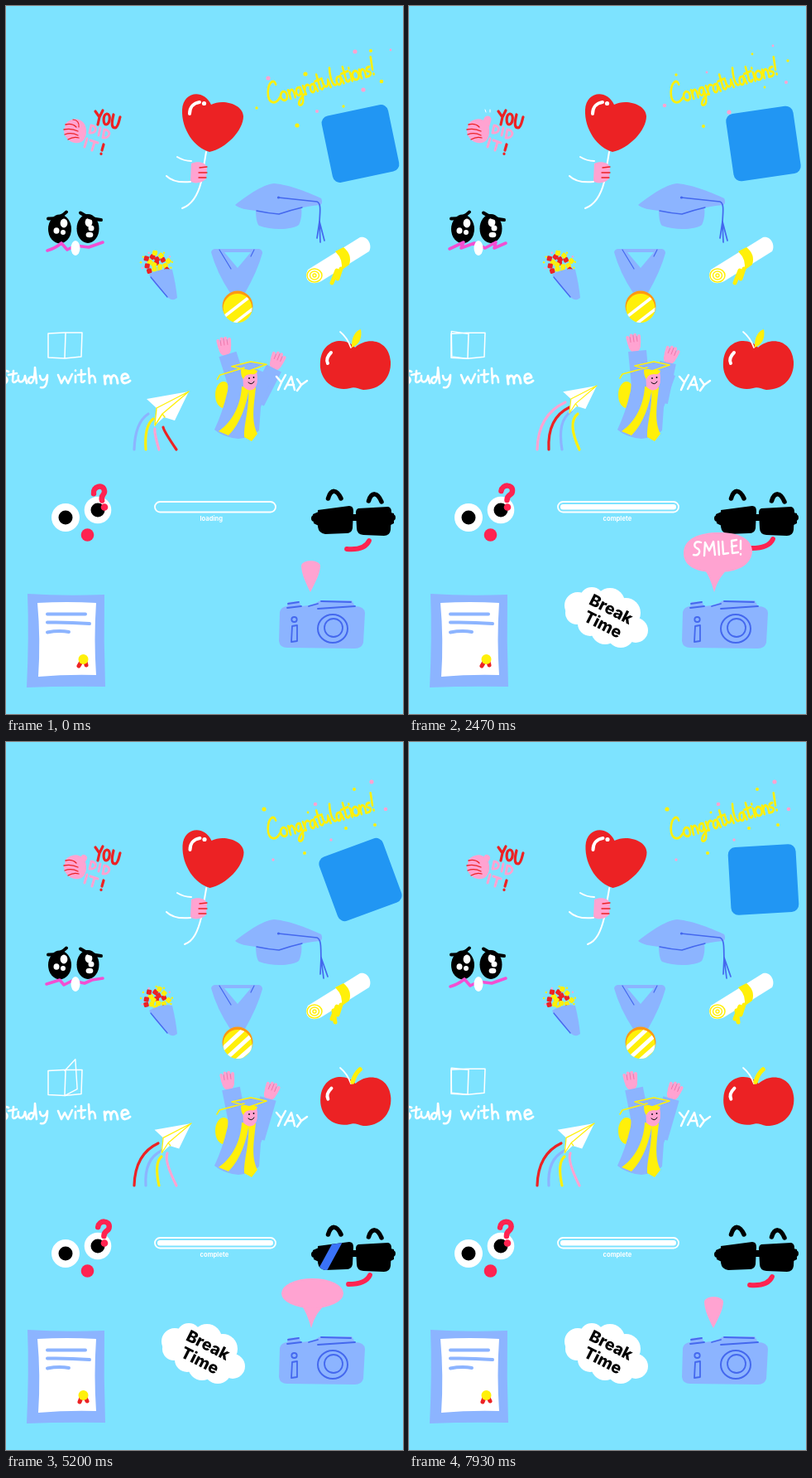
Recreate the animation shown at these times as an HTML page with a canvas. Size 480 px wide and 854 px high, loop 8000 ms.

```html
<!DOCTYPE html>
<html lang="en">
<head>
<meta charset="utf-8">
<title>Graduation stickers</title>
<style>
html, body { margin: 0; width: 100%; height: 100%; overflow: hidden; background: #7de3ff; }
canvas { display: block; width: 480px; height: 854px; }
</style>
</head>
<body>
<canvas id="stage"></canvas>
<script>
const canvas = document.getElementById('stage');
const ctx = canvas.getContext('2d');
const ratio = window.devicePixelRatio || 1;
canvas.width = 480 * ratio;
canvas.height = 854 * ratio;

const SKY = '#7de3ff', WHITE = '#fff', BLACK = '#000', RED = '#ec2224', PINK = '#ffa3d1';
const BLUE = '#8cb4ff', INK = '#4468ee', YELLOW = '#fff00a', CRIMSON = '#ff2350', MAGENTA = '#f24fd2';
const LOOP = 8000, FPS = 15, BEAT = 700, LOADER = 2950;

const cache = new Map();
function shape(d) {
  if (!cache.has(d)) cache.set(d, new Path2D(d));
  return cache.get(d);
}
function fill(d, color, rule = 'nonzero') {
  ctx.fillStyle = color;
  ctx.fill(shape(d), rule);
}
function line(d, color, width) {
  ctx.strokeStyle = color;
  ctx.lineWidth = width;
  ctx.stroke(shape(d));
}
function oval(x, y, rx, ry, color) {
  ctx.fillStyle = color;
  ctx.beginPath();
  ctx.ellipse(x, y, rx, ry, 0, 0, 7);
  ctx.fill();
}
const dot = (x, y, r, color) => oval(x, y, r, r, color);
function ring(x, y, rx, ry, color, width) {
  ctx.strokeStyle = color;
  ctx.lineWidth = width;
  ctx.beginPath();
  ctx.ellipse(x, y, rx, ry, 0, 0, 7);
  ctx.stroke();
}
function box(x, y, w, h, r, color) {
  ctx.fillStyle = color;
  ctx.beginPath();
  ctx.roundRect(x, y, w, h, r);
  ctx.fill();
}
// Draw inside a frame turned and scaled around (x, y).
function around(x, y, deg, scale, draw) {
  ctx.save();
  ctx.translate(x, y);
  ctx.rotate(deg * Math.PI / 180);
  ctx.scale(scale, scale);
  ctx.translate(-x, -y);
  draw();
  ctx.restore();
}
function star(x, y, r, points, color) {
  ctx.fillStyle = color;
  ctx.beginPath();
  for (let i = 0; i < points * 2; i++) {
    const a = i * Math.PI / points - 1.4, q = i % 2 ? r * 0.55 : r;
    ctx.lineTo(x + q * Math.cos(a), y + q * Math.sin(a));
  }
  ctx.fill();
}
const part = (t, period) => (t + 1) % period / period;
// Linear interpolation through [position, value] pairs.
function track(keys, x) {
  let i = 1;
  while (i < keys.length - 1 && x > keys[i][0]) i++;
  const [a, p] = keys[i - 1], [b, q] = keys[i];
  return p + (q - p) * Math.min(1, Math.max(0, (x - a) / (b - a)));
}

const CONGRATS = 'M14-20C14-27 6-25 2-14C-2-2 6 3 15-5M20-10C14-8 15 0 20 0C25-1 25-10 20-10M27-10L27 0M27-5C30-12 34-11 33 0' +
  'M42-9C36-12 34-2 38-1C42-1 42-9 42-9C43 0 43 9 37 10C33 10 35 4 46-1M46-10L47 0M47-5C48-9 51-11 53-9';
const ATION = 'M60-8C54-12 52-1 56 0C60 0 60-9 60-9L62 0M66-18L66-2Q68 1 70-2M62-11L71-12';
const CONGRATS_END = 'M71-10C70 0 77 1 78-9L79 0M84-21C81-10 82 0 86-1M107-10L107 0M107-15L107-14.5' +
  'M113-10C107-8 108 0 113 0C118-1 118-10 113-10M119-10L119 0M119-5C122-12 126-11 125 0' +
  'M132-10C126-10 127-5 130-5C134-3 130 1 126 0M137-20L135-6M135-1L135-.5';

// Confetti per step: yellow points, then pink points.
const CONFETTI = [
  [[303,123, 352,144, 362,82, 408,121, 441,54, 454,91], [317,87, 376,127, 422,55, 432,101, 465,53]],
  [[312,81, 361,134, 411,104, 421,57, 446,100, 365,85], [323,142, 374,75, 393,118, 442,48, 459,81]],
  [[323,83, 356,145, 415,58, 430,98, 458,66], [309,120, 360,80, 387,128, 440,48, 456,92]],
  [[315,86, 358,138, 396,72, 409,124, 434,113, 463,53, 453,104], [306,119, 383,128, 365,80, 417,106, 422,63, 452,62]]
];

function congratulations(k) {
  CONFETTI[k].forEach((pts, c) => {
    for (let i = 0; i < pts.length; i += 2) {
      dot(pts[i], pts[i + 1], 1.4 + (pts[i] * 7 % 5) * 0.3, c ? PINK : YELLOW);
    }
  });
  ctx.save();
  ctx.translate(319, 119);
  ctx.rotate(-0.28);
  ctx.scale(0.97, 1.08);
  line(CONGRATS, YELLOW, 2.7);
  line(ATION, YELLOW, 2.7);
  line(CONGRATS_END, YELLOW, 2.7);
  ctx.translate(34, 0);
  line(ATION, YELLOW, 2.7);
  ctx.restore();
}

function thumb(k) {
  if (k > 1) {
    line('M90 152L95 137', PINK, 9);
    line('M98 128L98 125M93 128L92 125', WHITE, 1);
  } else if (k === 1) line('M89 148L94 140', PINK, 8);
  fill('M72 142C78 135 88 134 94 141C99 148 98 160 91 164C82 168 72 162 70 152Z', PINK);
  line('M72 143Q80 141 85 146M70 149Q79 147 87 151M71 155Q79 152 87 156M75 161Q82 157 88 159', RED, 1.3);
  if (k < 1) line('M81 137Q89 138 88 146', RED, 1.2);
  line('M108 127L113 134L117 126M113 134L111 143M122 130C117 131 117 143 121 143C126 142 127 130 122 130' +
    'M130 131C127 143 128 147 132 147C136 146 137 136 138 134', RED, 3.2);
  line('M103 144L101 153M103 144C111 145 110 154 101 153M114 147L112 156M119 149L117 159M119 149C128 150 126 160 117 159' +
    'M98 160L95 170M102 162L111 165M107 164L104 174', PINK, 3);
  line('M118 167L116 174M115 178L115 178.5', RED, 3.2);
}

function balloon(k) {
  const shift = [0, 0.5, 0, -4][k], end = [213, 216, 213, 209][k];
  line(`M${242 + shift / 2} 176L236 212C232 228 ${end + 11} 240 ${end} 244`, WHITE, 2);
  ctx.save();
  ctx.translate(shift, 0);
  fill('M246 176C228 171 212 149 213 125C214 104 238 99 248 119C262 112 286 118 287 133C287 150 266 172 246 176Z', RED);
  line('M222 130C222 122 227 117 234 116', WHITE, 4);
  dot(239.5, 117.5, 2.6, WHITE);
  ctx.restore();
  fill('M224 190C232 186 242 189 243 195L242 208C238 214 226 215 223 211Z', PINK);
  line('M234 195L243 194M233 201L243 201M233 207L242 207', RED, 1.3);
  line('M207 182Q215 187 224 187M223 212Q203 214 194 205', WHITE, 2);
}

function cap(k) {
  const dx = [0, 4, 0, -5][k];
  fill('M302 245C302 254 303 262 306 265C322 271 346 270 354 264C357 258 358 250 357 243Z', BLUE);
  fill('M277 240C290 230 308 216 324 214C345 216 368 226 381 232C383 236 382 239 380 240C360 242 345 246 330 251C310 245 288 249 277 240Z', BLUE);
  line('M303 247Q317 250 330 251Q345 246 358 243', INK, 1.4);
  line(`M329 231L376 236C382 238 ${379 + dx / 3} 252 ${379 + dx / 2} 262`, INK, 1.7);
  const x = 379 + dx / 2;
  line(`M${x} 260L${376 + dx} 280M${x} 260L${380 + dx} 285M${x} 260L${385 + dx} 283`, INK, 1.7);
  dot(329.5, 231, 1.6, INK);
}

const TILT = [[0, 0.27], [1733, 2.27], [3200, 4.16], [4200, 5.5], [5200, 6.56], [6200, 8], [7933, 10.13]];
function tile(t) {
  const angle = -10.5 + 10.5 * Math.cos(2 * Math.PI * track(TILT, t));
  around(428.5, 166, angle, 1, () => box(387.5, 125, 82, 82, 9, '#2196f3'));
}

function sadFace(t) {
  const p = part(t, 900);
  oval(65, 269, 14, 17.5, BLACK);
  oval(99, 268.5, 13.5, 17.5, BLACK);
  oval(70, 262, 4.4, 5.4, WHITE);
  oval(61, 271, 3.5, 3.8, WHITE);
  oval(69, 273, 3, 3, WHITE);
  oval(100, 261, 4.4, 5.4, WHITE);
  oval(103, 268, 3.5, 3.5, WHITE);
  oval(101, 276, 4.4, 3.2, WHITE);
  line('M51 256.5Q65 257 73 248.5M90 249.5Q101 257 115 258', BLACK, 4);
  const mouth = p > 0.45 && p < 0.76
    ? 'M49 293L66 285L63 292L79 286L92 292L105 285L103 292L117 286'
    : p > 0.76 && p < 0.8 ? 'M49 292L65 287L70 293L80 288L95 291L104 287L117 285'
      : 'M50 295C58 293 62 290 67 286L74 294L84 289L100 291L117 285';
  line(mouth, MAGENTA, 3.6);
  oval(84, 292, 5.5, 9, WHITE);
}

function bouquet(k) {
  const turn = k % 2;
  for (let i = 0; i < 17; i++) {
    const a = i * 2.4 + turn * 0.35, r = 3.7 * Math.sqrt(i);
    const x = 182 + r * Math.cos(a) * 1.1, y = 310 + r * Math.sin(a) * 0.85;
    around(x, y, i * 31, 1, () => box(x - 3, y - 3, 6, 6, 1.5, [RED, YELLOW, PINK, YELLOW, RED][i * i * 3 % 7 % 5]));
  }
  for (let i = 0; i < 9; i++) {
    const a = 2.7 + i * 0.5;
    dot(182 + 19 * Math.cos(a), 310 + (14 + turn) * Math.sin(a), 1.2, i % 3 ? YELLOW : PINK);
  }
  fill('M173 324C182 318 195 316 201 318C204 330 206 342 207 352C202 356 199 354 196 352C188 344 178 334 173 324Z', BLUE);
  line('M175 327L195 351', INK, 1.3);
}

function medal(k) {
  fill('M248 297Q249 293 253 293L306 293Q310 294 310 298Q304 320 289 346L271 346Q255 322 248 297ZM264 297L296 297L280 316Z', BLUE, 'evenodd');
  line('M258 294L272 317M300 294L296 302', INK, 1.2);
  dot(280, 362, 18.5, '#ff9812');
  ctx.save();
  ctx.beginPath();
  ctx.arc(280, 364.5, 17.5, 0, 7);
  ctx.clip();
  ctx.fillStyle = YELLOW;
  ctx.fillRect(260, 344, 42, 42);
  if (k % 2 === 0) line('M262 376L293 352M274 384L300 364', WHITE, 3.6);
  if (k === 1) line('M258 374L287 347M266 382L299 352M276 387L302 364', WHITE, 5);
  ctx.restore();
  if (k === 3) fill('M299 359Q299 365 303 366Q299 367 299 373Q298 367 294 366Q298 365 299 359Z', WHITE);
}

function scroll(k) {
  fill('M365 318L428 279C438 277 443 289 439 296L381 332C371 337 362 333 363 323Z', WHITE);
  line('M400 319L394 334M405 317L401 329' + (k % 2 ? 'M396 324L398 338' : ''), YELLOW, 5);
  fill('M398 296L408 291Q419 300 415 312L405 319Q409 307 398 296Z', YELLOW);
  ring(373, 325, 9, 8, YELLOW, 1.5);
  ring(373, 325, 5.5, 5, YELLOW, 1.5);
  ring(373, 325, 2, 2, YELLOW, 1.4);
}

function apple(k) {
  around(424, 462, k % 2 ? 0.6 : 0, 1, () => {
    fill('M422 412C410 398 382 402 380 429C378 451 396 466 416 461C422 459 426 462 432 463C452 463 466 449 465 429C463 403 438 398 422 412Z', RED);
    line('M389 431Q386 425 393 418', WHITE, 4);
  });
  line('M417 412C414 404 409 397 404 393', WHITE, 1.8);
  if (k % 2) line('M419 410Q422 400 428 395', YELLOW, 5.5);
  else fill('M418 412C417 400 423 391 429 390C431 400 427 409 418 412Z', YELLOW);
}

const PAGE = [[0, 0], [0.04, 0], [0.3, 165], [0.36, 180], [0.36001, 0], [0.6, 0], [0.76, 90], [0.92, 180], [1, 180]];
function book(t) {
  const a = track(PAGE, part(t, 850)) * Math.PI / 180, lift = Math.sin(a);
  ctx.save();
  ctx.translate(0, 2 * lift);
  line('M51 395L70 394L92 394L91 423L71 425L51 424ZM72 395L71 424', WHITE, 1.5);
  if (lift > 0.02) {
    const x = 71 + 20 * Math.cos(a);
    line(`M71 395L${x} ${395 - 18 * lift}L${x + 3 * lift} ${424 - 9 * lift}L71 425`, WHITE, 1.4);
  }
  ctx.restore();
  line('M3 441C-4 438-8 445-2 447C4 449 2 457-6 455M9 440L8 452Q9 456 13 452M3 445L13 443M15 446C13 456 22 456 23 446L25 455' +
    'M33 448C27 445 25 455 30 455C35 454 35 436 35 436L37 455M41 446C42 454 48 452 50 445C50 452 49 462 42 460' +
    'M63 445L67 455L71 447L75 455L80 444M84 446L84 454M84 439.5L84 440M91 439L91 453Q93 455 95 452M87 445L96 444' +
    'M100 437L101 455M101 449C104 443 108 446 108 454', WHITE, 2.6);
  line('M119 446L120 456M120 450C122 444 127 444 127 455M127 450C129 443 134 444 135 455' +
    'M140 450L148 448C147 441 138 443 140 451C141 457 147 455 150 452', WHITE, 3);
}

function plane(k) {
  const nose = [[221, 465], [224, 460], [227, 458], [231, 458]][k], size = [1, 0.87, 0.8, 0.68][k];
  const colors = [BLUE, YELLOW, PINK, RED];
  const feet = [155, 169, 185, 206], bend = [1, -2, -6, -15];
  const tipX = [[172, 178, 180, 190], [184, 188, 188, 195], [189, 194, 196, 204], [197, 200, 203, 211]][k];
  const tipY = [[492, 498, 510, 508], [484, 493, 500, 496], [478, 484, 489, 492], [474, 481, 486, 486]][k];
  feet.forEach((x, i) => {
    const foot = x - (k === 3 ? 2 : 0);
    line(`M${foot} 535Q${foot + bend[i]} ${(tipY[i] * 2 + 535) / 3 - 4} ${tipX[i]} ${tipY[i]}`, colors[(i - k + 4) % 4], 3.2);
  });
  ctx.save();
  ctx.translate(...nose);
  ctx.scale(size, size);
  fill('M0 0L-51 9L-39 20L-42 42L-30 31L-17 35Z', WHITE);
  line('M0 0L-39 20L-41 40M0 0L-32 27L-41 41M-32 27L-29 31', YELLOW, 1.4);
  ctx.restore();
}

function hand(x, y, tilt) {
  around(x, y, tilt, 1, () => {
    oval(x, y + 4, 7.5, 9, PINK);
    for (let i = -1.5; i < 2; i++) line(`M${x + i * 4} ${y + 2}L${x + i * 4.6} ${y - 9 + Math.abs(i) * 2}`, PINK, 4);
    line(`M${x - 4} ${y}L${x - 4} ${y - 6}M${x} ${y}L${x} ${y - 8}M${x + 4} ${y}L${x + 4} ${y - 6}`, '#ec70a6', 0.8);
  });
}
function graduate(k) {
  const [lx, ly, rx, ry] = [[264, 409, 328, 427], [268, 407, 321, 420], [272, 405, 317, 420], [268, 407, 321, 420]][k];
  hand(lx, ly, -8);
  hand(rx, ry, 22);
  oval(263, 469, 10, 16, YELLOW);
  ctx.lineCap = 'butt';
  line(`M280 458L${lx + 4} ${ly + 11}`, BLUE, 22);
  line(`M303 478L${rx - 4} ${ry + 10}`, BLUE, 20);
  ctx.lineCap = 'round';
  fill('M270 442L298 436L322 446L308 484L306 512Q296 521 281 522Q262 520 252 511Q262 490 268 464Z', BLUE);
  fill('M285 459C284 482 273 502 257 513L269 518C284 503 291 480 294 460Z', YELLOW);
  fill('M293 460C295 484 287 505 288 520L297 525L304 516C296 500 300 480 302 460Z', YELLOW);
  fill('M286 440L303 440Q306 456 300 462Q293 466 287 459Z', PINK);
  fill('M284 439Q294 435 304 440Q303 445 296 444Q289 444 287 450Q284 447 284 439Z', YELLOW);
  dot(294, 449, 0.9, BLACK);
  dot(299.5, 448, 0.9, BLACK);
  line('M293 454Q297 458 300 453', BLACK, 1);
  around(295, 435, k ? 0 : -2, 1, () => {
    fill('M273 434L296 429L315 433L294 440Z', BLUE);
    line('M273 434L296 429L315 433L294 440ZM288 436L258 444L255 449', YELLOW, 1.6);
  });
  line('M327 447L333 454L338 445M333 454L329 463M337 462L345 447L349 463M340 457L348 457M352 450L357 457L364 452M357 457L352 464', WHITE, 2.5);
}

function wonder(t) {
  dot(72, 617, 17, WHITE);
  dot(111, 608, 16.3, WHITE);
  dot(72, 617, 8.5, BLACK);
  dot(111, 608, 8.5, BLACK);
  dot(98.5, 638, 7.8, CRIMSON);
  dot(119, 604.5, 4.3, CRIMSON);
  around(119, 604, -9 * (1 + Math.cos(2 * Math.PI * part(t, BEAT))), 1, () =>
    line('M111.5 585C113 576 126 577 125 585C125 591 119 588 118.5 596', CRIMSON, 6.5));
}

const BAR = [[0, 0], [120, 0], [150, 6], [255, 6], [280, 14], [1250, 67], [1733, 94], [1960, 108], [1990, 140], [2950, 140]];
function loader(t) {
  const p = t % LOADER, width = track(BAR, p);
  ctx.strokeStyle = WHITE;
  ctx.lineWidth = 1.8;
  ctx.beginPath();
  ctx.roundRect(180, 598, 146, 12.5, 6.2);
  ctx.stroke();
  if (width) box(183, 601, width, 6.5, Math.min(3.2, width / 2), WHITE);
  const dots = Math.floor(p / 490);
  ctx.fillStyle = WHITE;
  ctx.font = '700 7.6px Inter, sans-serif';
  ctx.textAlign = 'left';
  ctx.textBaseline = 'alphabetic';
  ctx.fillText(width === 140 ? 'complete' : 'loading ' + '.'.repeat(dots), 234.5, 621);
}

const LENSES = 'M377 608L415 603Q420 603 420 609L419 630Q418 636 411 636L386 637Q378 636 377 628Z' +
  'M426 606L462 604Q466 605 466 610L465 632Q464 639 457 639L432 638Q424 637 424 630L423 611Q423 607 426 606Z';
function shades(t) {
  const p = (t + 700) % 1950;
  line('M373 618L380 618M418 617L428 617M464 617L467 617', BLACK, 8);
  fill('M371 613L378 610L378 627L372 624ZM465 611L469 612L469 624L465 626Z', BLACK);
  fill(LENSES, BLACK);
  if (p < 250) {
    const x = 369 + p * 0.46;
    ctx.save();
    ctx.clip(shape(LENSES));
    line(`M${x + 12} 598L${x - 12} 642`, '#3a72f8', 10);
    ctx.restore();
  }
  line('M389.5 594C393 582 400 583 405 594M438.500 597C442 586 449 586 454 598', BLACK, 5.5);
  line(p > 400 && p < 900 ? 'M412 655C424 656 435 654 439 645' : 'M414 654C426 654 436 652 440 643', CRIMSON, 5.8);
}

function certificate(k) {
  const nudge = k === 3 ? 1 : 0;
  fill(`M${26 + nudge} 709Q70 712 ${119 + nudge} 710Q118 766 120 821Q72 820 ${25 + nudge} 822Q28 760 ${26 + nudge} 709Z`, BLUE);
  fill('M38 720Q74 718 109 720Q106 764 109 807Q74 806 39 809Q42 764 38 720Z', WHITE);
  line('M50 733.5L96 733.5M50 743.5Q76 743 101 745M50 755.5Q64 753 76 755', BLUE, 4);
  const sway = [0, 1, 0, 2][k];
  line(`M91 791L${88 + sway} 796M96 791L${97 + sway} 795`, RED, 5);
  dot(93.5, 788, 6, YELLOW);
}

function camera(t) {
  const p = part(t, 1000);
  fill('M331 731Q332 725 340 724L341 719L354 718L357 724L366 723L375 720L380 717L418 717L422 724Q433 724 434 732L432 768Q430 775 422 775L340 774Q331 774 330 766Z', BLUE);
  line('M341 721L354 719M366 724L377 721M381 718L417 719M340 726L357 724M377 727L422 724', INK, 1.8);
  ring(395, 751, 18, 17, INK, 2);
  ring(396, 750, 11, 11, INK, 1.8);
  ring(348.5, 740, 3.2, 3, INK, 1.8);
  line('M346 748L352 747L352 766L345 767Z', INK, 1.8);
  if (p > 0.62 && p < 0.86) star(416, 738, 12.5, 7, WHITE);
  if (p < 0.1 || p > 0.9) {
    fill('M357 675C359 667 379 668 380 675C380 685 373 697 368 707C363 697 357 685 357 675Z', PINK);
    return;
  }
  fill('M356 678Q364 688 369 707Q374 688 388 677Z', PINK);
  if (p < 0.35) {
    oval(370.5, 665, 37.5, 18, PINK);
    return;
  }
  fill('M332 660C332 642 352 635 374 635C398 635 415 642 415 658C414 675 396 683 374 683C350 684 332 677 332 660Z', PINK);
  line('M353 647C345 644 343 652 348 654C354 656 351 664 344 662M357 663L358 647L363 657L368 646L370 662M374 646L375 662' +
    'M379 646L380 661L386 660M396 644L390 645L391 660L398 659M390 652L396 651M401 645L401 655M401 661L401 661.5', WHITE, 2.4);
}

const PUFFS = [204,723,16, 221,716,15, 243,720,18, 262,732,18, 274,753,15, 256,757,17, 237,753,17, 219,745,15, 203,732,14, 240,737,26];
function cloud(t) {
  const p = t % LOADER;
  const scale = track([[0, 0], [60, 0], [170, 1.08], [250, 1.04], [290, 1]], p);
  if (!scale) return;
  around(238, 737, 0, scale, () => {
    for (let i = 0; i < PUFFS.length; i += 3) dot(PUFFS[i], PUFFS[i + 1], PUFFS[i + 2], WHITE);
    ctx.translate(239, 737);
    ctx.rotate(0.47);
    ctx.fillStyle = BLACK;
    ctx.textAlign = 'center';
    ctx.textBaseline = 'middle';
    ctx.font = `800 ${p < 280 ? 22.5 : 19.5}px Inter, sans-serif`;
    ctx.fillText('Break', 0.5, -10);
    ctx.fillText('Time', 0, 11);
  });
}

function draw(t) {
  ctx.setTransform(ratio, 0, 0, ratio, 0, 0);
  ctx.fillStyle = SKY;
  ctx.fillRect(0, 0, 480, 854);
  ctx.lineCap = ctx.lineJoin = 'round';
  const k = Math.floor(part(t, BEAT) * 4);
  for (const sticker of [congratulations, thumb, balloon, cap, bouquet, medal, scroll, apple, plane, graduate, certificate]) sticker(k);
  for (const sticker of [tile, sadFace, book, wonder, loader, shades, camera, cloud]) sticker(t);
}

const start = performance.now();
function tick() {
  const time = (performance.now() - start) % LOOP;
  draw(Math.floor(time * FPS / 1000 + 0.06) % (LOOP * FPS / 1000) * 1000 / FPS);
  requestAnimationFrame(tick);
}
draw(0);
requestAnimationFrame(tick);
</script>
</body>
</html>
```
